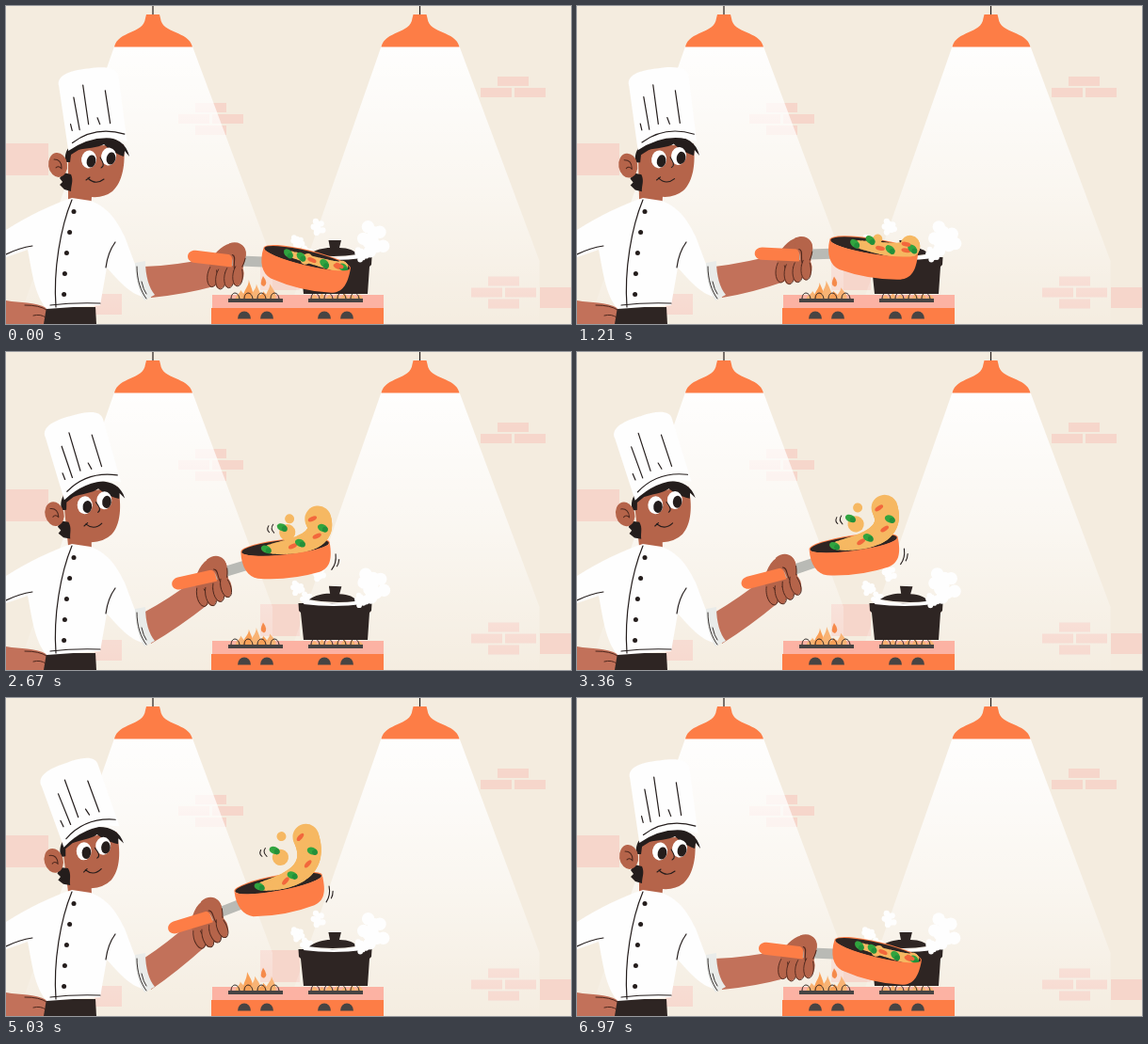
Recreate the animation shown at these times as an HTML page with a canvas. Size 600 px wide and 338 px high, loop 7 s.

```html
<!DOCTYPE html>
<html>
<head>
<meta charset="utf-8">
<style>
html, body { margin: 0; width: 100%; height: 100%; overflow: hidden; background: #f4ecdf; }
canvas { display: block; width: 600px; height: 338px; }
</style>
</head>
<body>
<canvas id="stage" width="600" height="338"></canvas>
<script>
const ctx = document.getElementById('stage').getContext('2d');
const ORANGE = '#fd7d46', DARK = '#2e2523', FACE = '#b5644a', ARM = '#c2715a', WHITE = '#fefefe';
const GREY = '#474443', INK = '#241d1c', CREASE = '#4d281e';
const FOOD = '#f6b862', GREEN = '#31a43f', RED = '#f2673c';
const LOOP = 7000, SLOW_IN = 1485, SLOW_OUT = 5150, SLOW_RATE = 0.12;

function fill(d, color) { ctx.fillStyle = color; ctx.fill(new Path2D(d)); }
function line(d, width = 1.2, color = INK) {
  ctx.strokeStyle = color; ctx.lineWidth = width;
  ctx.lineCap = ctx.lineJoin = 'round';
  ctx.stroke(new Path2D(d));
}
function rect(x, y, w, h, color) { ctx.fillStyle = color; ctx.fillRect(x, y, w, h); }
function oval(x, y, rx, ry, color, angle = 0) {
  ctx.fillStyle = color; ctx.beginPath();
  ctx.ellipse(x, y, rx, ry, angle, 0, 7); ctx.fill();
}
function dot(x, y, r, color) { oval(x, y, r, r, color); }
function group(x, y, degrees, draw) {
  ctx.save(); ctx.translate(x, y); ctx.rotate(degrees * Math.PI / 180);
  draw(); ctx.restore();
}
// Turns a drawing in stage coordinates around a pivot.
function turn(x, y, degrees, draw) {
  group(x, y, degrees, () => { ctx.translate(-x, -y); draw(); });
}

// Poses: lift is how far the food has left the pan.
const rest = { x: 273, y: 272, angle: 2.5, hat: -5.5, lift: 0 };
const settle = { ...rest, hat: -2 };
const dip = { x: 275, y: 281, angle: 5, hat: -2, lift: 5 };
const launch = { x: 258.5, y: 233, angle: -13.5, hat: -6.5, lift: 13 };
const peak = { x: 248, y: 219.5, angle: -21.5, hat: -10, lift: 44 };

const smooth = k => k * k * (3 - 2 * k);
const drift = k => 1 - (1 - k) ** 1.5;
const keys = [
  [0, rest], [850, dip, smooth], [1020, dip, smooth], [SLOW_IN, launch, smooth],
  [SLOW_OUT, peak, drift], [5560, settle, smooth], [5760, settle, smooth],
  [6640, rest, smooth], [LOOP, rest, smooth]
];
function poseAt(t) {
  const i = keys.findIndex(key => key[0] > t);
  const [from, a] = keys[i - 1], [to, b, ease] = keys[i];
  const k = ease((t - from) / (to - from)), pose = {};
  for (const part in a) pose[part] = a[part] + (b[part] - a[part]) * k;
  return pose;
}
// Phase of fire and steam, slowed while the food hangs in the air.
function phaseAt(t) {
  const slow = Math.min(Math.max(t - SLOW_IN, 0), SLOW_OUT - SLOW_IN);
  const total = LOOP - (SLOW_OUT - SLOW_IN) * (1 - SLOW_RATE);
  return (t - slow * (1 - SLOW_RATE)) / total * Math.PI * 2;
}

function brick(x, y, w = 33, h = 10) { rect(x, y, w, h, '#f6d6cb'); }
function bricks(x, y, rows) {
  for (let row = 0; row < rows; row++)
    for (const shift of row % 2 ? [-18, 18] : [0]) brick(x + shift, y + row * 12);
}

function lamp(x) {
  ctx.save(); ctx.translate(x, 0);
  const light = ctx.createLinearGradient(0, 43, 0, 338);
  light.addColorStop(0, 'rgba(255,255,255,.95)');
  light.addColorStop(0.5, 'rgba(255,255,255,.56)');
  light.addColorStop(1, 'rgba(255,255,255,.05)');
  fill('M115,43 H198 L283,271 V338 H12Z', light);
  line('M156,0 V10');
  fill('M149,9 H163 L164,13 C166,30 194,26 198,43.5 H115 C119,26 146,30 148,13Z', ORANGE);
  ctx.restore();
}

function room() {
  rect(0, 0, 600, 338, '#f4ecdf');
  bricks(201, 103, 3); bricks(522, 75, 2); bricks(512, 287.5, 3);
  brick(567, 299, 33, 22); brick(0, 146, 45, 34); brick(94, 306, 29, 22); brick(270, 268, 42, 34);
  lamp(0); lamp(283.5);
}

function flame(x, w, h, sway, color) {
  const y = 312;
  fill(`M${x - w},${y} C${x - w},${y - h * .5} ${x + sway},${y - h * .6} ${x + sway},${y - h}
    C${x + w * .4},${y - h * .7} ${x + w * 1.2},${y - h * .4} ${x + w},${y}Z`, color);
}

function stove(phase) {
  rect(219, 307, 182, 14, '#fcb2a3');
  rect(218, 321, 183, 17, ORANGE);
  for (const x of [253, 277, 338, 362]) fill(`M${x - 7},332.5 a7,8 0 0 1 14,0Z`, GREY);
  for (let i = 0; i < 5; i++)
    flame(249 + i * 8, 5.5, 15 + 6 * Math.sin(i * 1.8 - 1) + 2 * Math.sin(8 * phase + i * 2),
      Math.sin(7 * phase + i), i % 2 ? '#f9a057' : '#f8b374');
  fill(`M273,${287 - Math.sin(6 * phase)} q6,8 1,11 q-6,-1 -1,-11Z`, '#f58a4b');
  for (let i = 0; i < 7; i++)
    flame(327 + i * 8, 4, 6 + Math.sin(9 * phase + i * 2), 0, '#f9b070');
  for (const x of [236, 321]) {
    for (let i = 0; i < 4; i++) line(`M${x + 3 + i * 14},311 c0,-8 8,-8 9,0`, 1);
    rect(x, 311, 58, 4, GREY);
  }
}

function steam(x, y, size, phase) {
  for (let i = 0; i < 9; i++) {
    const a = i * 2.4 + 0.15 * Math.sin(4 * phase + i), d = size * Math.sqrt(i / 9);
    dot(x + Math.cos(a) * d, y + Math.sin(a) * d * 1.15, size * 0.48, WHITE);
  }
}

function pot(phase) {
  steam(331, 235, 6.5, phase);
  steam(309, 251, 6, phase + 1);
  steam(319, 263, 6, phase + 2);
  fill('M310.5,267 H388.5 L388,275 L386,277 L384,306 H316 L313,277 L311,275Z', DARK);
  fill('M317,264 Q348,271 380,263 L379,268 Q348,272 316,268Z', WHITE);
  turn(348, 262, 2 * Math.sin(5 * phase), () =>
    fill('M322,264 C328,259 338,257 344,257 L342.5,249 H356 L354,257 C364,257 370,260 373,264 Q348,268 322,264Z', DARK));
  steam(389, 248, 14, phase);
  steam(377, 264, 6, phase + 1);
}

function hat() {
  fill('M65,151 L61.5,82 C59,69 78,66 94,66 C110,65 126,67 125.5,78 L128,147 Q97,133 65,151Z', WHITE);
  line('M70,143 Q96,127 126,139');
  line('M76,95 L79,130 M87,83 L89,125 M110,91 L112,126 M99,119 L101,126 M70,123 L71,130');
}

function eye(x, y) {
  oval(x, y, 8, 9.5, WHITE, 0.15);
  oval(x + 2.5, y + 2, 4.8, 6.6, INK, 0.2);
}

function head(pose) {
  turn(84, 205, pose.angle * 0.3 - 0.7, () => {
    fill('M66,150 L125,147 C127,168 124,187 113,197 Q104,204 91,203 L90,215 H66Z', FACE);
    fill(`M63,166 C61,150 72,141 96,139 C116,138 128,145 131,160 L126,154 L125,160
      C114,156 108,151 104,147 C98,151 84,151 77,153 L69,158 L68,166Z`, INK);
    fill('M61,177 L69,179 C72,186 69,190 69,197 L62,195 L57,190 L60,187 L57,183Z', INK);
    oval(55, 169, 10, 13, FACE, -0.15);
    line('M51,163 q8,0 8,9 M53,172 q3,-3 6,1', 1, CREASE);
    eye(88, 163); eye(109, 160);
    line('M100,161 C103,166 105,170 101,172', 1);
    line('M87,183 Q95,191 104,184 M85,185 l4,-3', 1.1);
    turn(96, 140, pose.hat, hat);
  });
}

function torso() {
  fill('M0,313 C16,316 30,314 43,321 V338 H0Z', ARM);
  fill('M43,320 H95 L96,338 H40Z', DARK);
  fill(`M0,238 C24,223 48,211 70,204 L90,207 C110,215 118,229 126,245 L150,309
    C136,310 122,295 107,278 L100,318 L43,322 C30,306 28,284 23,259 L0,267Z`, WHITE);
  line('M70,206 C58,235 50,280 53,320');
  line('M0,264 Q14,257 28,255 M116,251 Q108,262 106,278 M47,318 Q72,315 100,316');
  line('M20,318 Q36,318 43,323 M29,329 q8,-2 13,2', 1, CREASE);
  for (let i = 0; i < 5; i++) dot(72 - 5 * i + 0.6 * i * i, 218.5 + 22 * i, 2.5, INK);
}

function forearm({ x, y, angle }) {
  const a = angle * Math.PI / 180;
  const at = (u, v) => [x + u * Math.cos(a) - v * Math.sin(a), y + u * Math.sin(a) + v * Math.cos(a)];
  const top = at(-54, -2), low = at(-50, 28);
  const between = (px, py, [qx, qy]) => [(px + qx) / 2, (py + qy) / 2 + 3];
  fill(`M146,277 Q${between(146, 277, top)} ${top} L${at(-36, 8)} L${low} Q${between(154, 310, low)} 154,310Z`, ARM);
  fill('M137,273 L148,271 C148,287 152,300 158,307 L147,313 C140,302 137,288 137,273Z', '#e9ebe9');
  line('M139,277 C139,291 143,303 149,311 M144,293 q2,9 5,13', 0.9);
}

// Food runs along a curve from the pan floor up to its flying tip.
function food(lift) {
  const at = k => [24 * (1 - k) ** 2 + 184 * k * (1 - k) + 82 * k * k,
    -15 * (1 - k) ** 2 - 24 * k * (1 - k) - (15 + lift) * k * k];
  const thick = 6 + 8 * Math.min(1, lift / 15);
  const green = (x, y) => { oval(x, y, 5.5, 3.8, GREEN, 0.5); dot(x + 2.5, y + 2, 3, '#23903a'); };
  dot(45 + lift * 0.27, -15 - lift * 1.1, 5, FOOD);
  dot(43 + lift * 0.2, -13 - lift * 0.65, 3 + thick * 0.4, FOOD);
  for (let k = 0; k <= 1; k += 0.03) dot(...at(k), 3 + (thick - 3) * Math.sqrt(k), FOOD);
  for (let i = 0; i < 6; i++) {
    const [x, y] = at(i / 5), side = Math.sin(i * 2.2) * thick * 0.4;
    if (i % 2) oval(x + side, y, 5, 2.3, RED, 0.2 - lift * 0.02);
    else green(x + side, y);
  }
  green(38 + lift * 0.2, -15 - lift * 0.8);
}

function speedLines(lift) {
  line('M97,-2 q0,10 -6,16 M100,4 q-1,5 -3,7', 1.1);
  const x = 29 + lift * 0.2, y = -19 - lift * 0.8;
  line(`M${x},${y} q-4,4 0,9 M${x - 5},${y + 1} q-3,4 0,7`, 1);
}

function panAndHand(pose, inAir) {
  const { x, y, angle, lift } = pose;
  group(x, y, angle, () => {
    fill('M-57,2 C-49,-12 -39,-20 -29,-18 C-18,-17 -17,-8 -20,4 L-25,20 L-55,26Z', FACE);
    line('M0,0 H-36', 11, '#b9bab5');
    fill('M-33,-6 L-72,-9 C-82,-9 -83,2 -74,4 L-33,7Z', ORANGE);
  });
  group(x, y, angle + 11, () => {
    oval(44.5, -15, 47.5, 8.5, ORANGE);
    oval(44.5, -14.6, 46.5, 7.8, DARK);
    food(lift);
    fill('M-3,-15 A47.5,8 0 0 0 92,-15 C93,4 89,12 78,15 Q45,21 12,15 C2,12 -4,2 -3,-15Z', ORANGE);
    if (inAir) speedLines(lift);
  });
  group(x, y, angle, () => {
    fill('M-37,-18 C-25,-23 -16,-14 -19,-3 C-20,6 -24,10 -29,10 C-35,8 -29,-3 -37,-7Z', FACE);
    line('M-33,-6 C-28,-5 -32,4 -30,9 M-19,-3 C-21,6 -23,10 -29,10', 1, CREASE);
    for (let i = 0; i < 4; i++) {
      const u = -53 + 9 * i, v = 18 + 2 * Math.sin(i * 1.5);
      oval(u, v, 6, 11, FACE, 0.15);
      line(`M${u - 3},${v - 10} C${u - 8},${v} ${u - 5},${v + 11} ${u},${v + 11}
        C${u + 5},${v + 10} ${u + 6},${v + 1} ${u + 4},${v - 7}`, 0.9, CREASE);
    }
  });
}

const start = performance.now();
function frame() {
  const t = (performance.now() - start) % LOOP, pose = poseAt(t), phase = phaseAt(t);
  room();
  stove(phase);
  pot(phase);
  head(pose);
  torso();
  forearm(pose);
  panAndHand(pose, t > SLOW_IN - 60 && t < SLOW_OUT + 60);
  requestAnimationFrame(frame);
}
frame();
</script>
</body>
</html>
```
